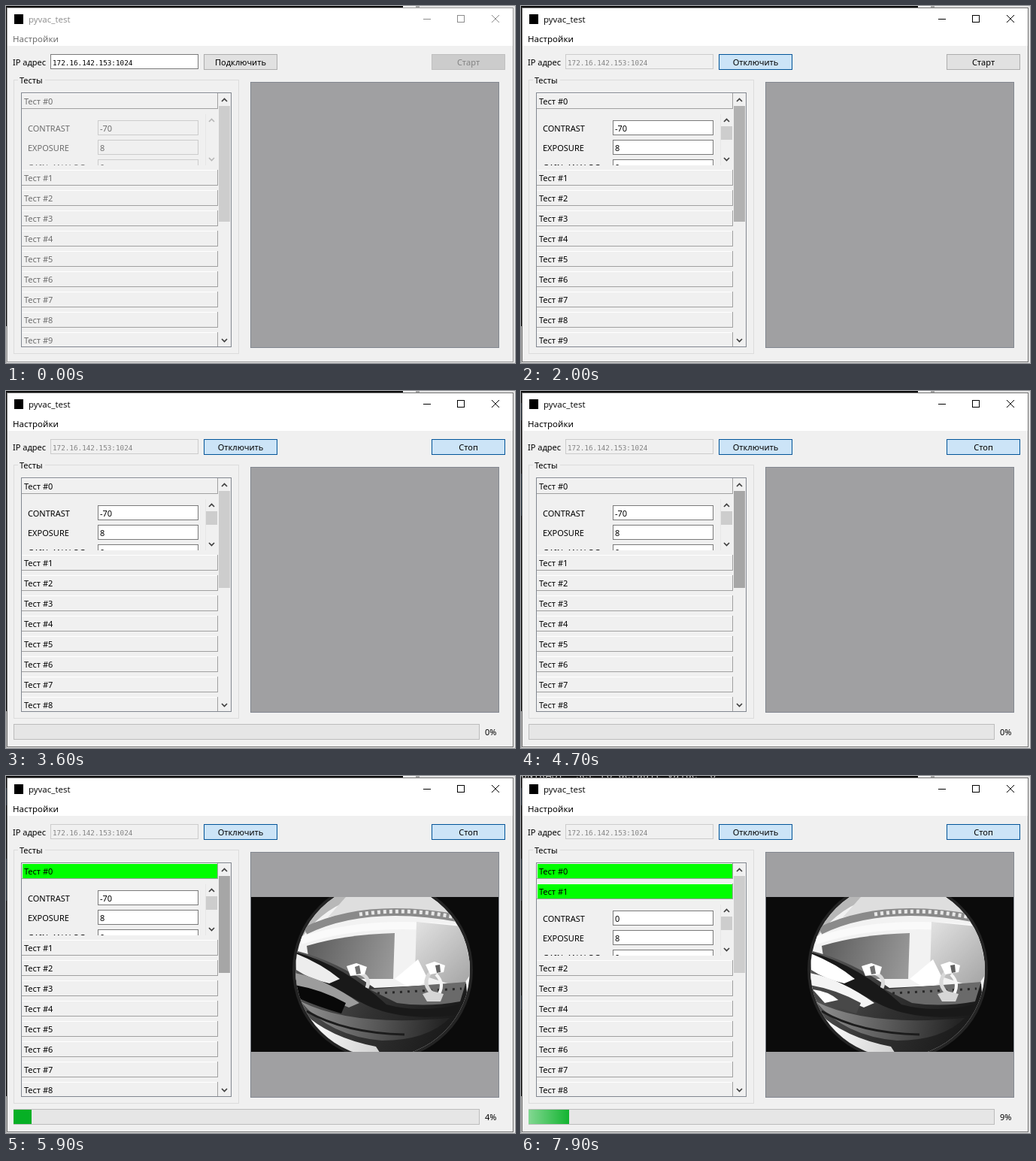
Write an HTML page with a canvas that moves like this. It is 677 by 475 pixels and loops after 8 s.

```html
<!DOCTYPE html>
<html lang="ru">
<head>
<meta charset="utf-8">
<title>pyvac_test</title>
<style>
  html, body { margin: 0; width: 100%; height: 100%; overflow: hidden; background: #f0f0f0; }
  canvas { display: block; }
</style>
</head>
<body>
<canvas id="stage" width="677" height="475"></canvas>
<script>
const ctx = document.getElementById('stage').getContext('2d');
const LOOP = 8000, STEP = 100;
const UI = '11px "Noto Sans", sans-serif';
const MENU = '11.5px "Noto Sans", sans-serif';
const TITLE = '11.5px "Open Sans", sans-serif';
const FIELD = '9.3px "DejaVu Sans Mono", monospace';
const CONSOLE = '13.5px "Liberation Mono", monospace';

const ramp = (t, from, to) => Math.min(1, Math.max(0, (t - from) / (to - from)));
const mix = (a, b, k) => `rgb(${a.map((v, i) => Math.round(v + (b[i] - v) * k))})`;
const gray = v => `rgb(${v},${v},${v})`;

function fill(x, y, w, h, color) {
  ctx.fillStyle = color;
  ctx.fillRect(x, y, w, h);
}

function box(x, y, w, h, back, border) {
  fill(x, y, w, h, border);
  fill(x + 1, y + 1, w - 2, h - 2, back);
}

function text(s, x, y, color = '#000', font = UI, align = 'left') {
  ctx.font = font;
  ctx.textAlign = align;
  ctx.fillStyle = color;
  ctx.fillText(s, x, y);
}

function line(points, color, width = 1) {
  ctx.beginPath();
  points.forEach(([x, y]) => ctx.lineTo(x, y));
  ctx.strokeStyle = color;
  ctx.lineWidth = width;
  ctx.stroke();
}

function shape(d, color) {
  ctx.fillStyle = color;
  ctx.fill(new Path2D(d));
}

function stroke(d, color, width) {
  ctx.strokeStyle = color;
  ctx.lineWidth = width;
  ctx.stroke(new Path2D(d));
}

function linear(x0, y0, x1, y1, ...colors) {
  const g = ctx.createLinearGradient(x0, y0, x1, y1);
  colors.forEach((c, i) => g.addColorStop(i / (colors.length - 1), c));
  return g;
}

function clipped(x, y, w, h, draw) {
  ctx.save();
  ctx.beginPath();
  ctx.rect(x, y, w, h);
  ctx.clip();
  draw();
  ctx.restore();
}

function chevron(x, y, dir, color) {
  line([[x - 3.5, y + 2 * dir], [x, y - 1.5 * dir], [x + 3.5, y + 2 * dir]], color, 1.7);
}

function button(x, label, press, enabled = true) {
  const back = press > 0 ? mix([229, 241, 251], [204, 228, 247], press) : '#e1e1e1';
  const border = press > 0 ? mix([0, 120, 215], [0, 84, 153], press) : '#adadad';
  box(x, 64, 98, 21, enabled ? back : '#cccccc', enabled ? border : '#bfbfbf');
  text(label, x + 49, 79, enabled ? '#000' : '#838383', UI, 'center');
}

function field(y, value, enabled) {
  box(122, y, 134, 20, enabled ? '#fff' : '#f0f0f0', enabled ? '#7a7a7a' : '#cccccc');
  text(value, 125, y + 15, enabled ? '#000' : '#6d6d6d');
}

function desktop(t) {
  fill(0, 0, 677, 475, '#e4e4e4');
  fill(0, 0, 528, 3, '#0c0c0c');
  fill(528, 0, 17, 3, '#f0f0f0');
  fill(545, 0, 5, 3, '#a8a8a8');
  fill(0, 0, 1, 426, '#0c0c0c');
  fill(0, 426, 1, 49, '#b4b4b4');
  if (t >= 3800) fill(0, 16, 1, 23, '#26303c');
  if (t >= 4700) fill(0, 110, 1, 56, '#26303c');
  if (t >= 6100) fill(0, 292, 1, 19, '#26303c');
  if (t >= 6400) clipped(0, 0, 528, 3, () =>
    text('ONTRAST  set to default value  0', 0, t >= 7300 ? 3 : 4, '#cccccc', CONSOLE));
}

function chrome(active) {
  const ink = active ? '#000' : '#8c8c8c';
  box(1, 2, 674, 472, '#f0f0f0', active ? '#707070' : '#9a9a9a');
  fill(2, 3, 672, 50, '#fff');
  fill(11, 11, 12, 13, '#000');
  text('pyvac_test', 30, 22, ink, TITLE);
  text('Настройки', 9, 48, active ? '#000' : '#6d6d6d', MENU);
  line([[555, 17.5], [565, 17.5]], ink);
  ctx.strokeStyle = ink;
  ctx.strokeRect(600.5, 12.5, 9, 9);
  line([[646, 12], [656, 22]], ink);
  line([[656, 12], [646, 22]], ink);
}

function tab(i, y, enabled, passed) {
  fill(21, y, 261, 21, '#f0f0f0');
  fill(21, y, 261, 1, '#fff');
  if (passed) fill(22, y + 1, 259, 19, '#00ff00');
  fill(21, y + 20, 261, 1, '#a0a0a0');
  fill(281, y, 1, 21, '#a0a0a0');
  text('Тест #' + i, 24, y + 15, enabled ? '#000' : '#6d6d6d');
}

function page(y, contrast, enabled) {
  const ink = enabled ? '#000' : '#6d6d6d';
  clipped(21, y, 261, 75, () => {
    [['CONTRAST', contrast], ['EXPOSURE', '8'], ['GAIN_ANALOG', '0']].forEach(([name, value], i) => {
      const top = y + 15 + 26 * i;
      text(name, 29, top + 15, ink);
      field(top, value, enabled);
    });
  });
  fill(265, y + 7, 1, 68, '#e6e6e6');
  chevron(273.5, y + 15, 1, enabled ? '#404040' : '#b8b8b8');
  chevron(273.5, y + 67, -1, enabled ? '#404040' : '#b8b8b8');
  if (enabled) fill(266, y + 23, 15, 18, '#cdcdcd');
}

function tests(t, enabled, bottom) {
  ctx.strokeStyle = '#dcdcdc';
  ctx.lineWidth = 1;
  ctx.strokeRect(10.5, 98.5, 299, bottom + 8 - 98);
  fill(16, 95, 36, 8, '#f0f0f0');
  text('Тесты', 18, 103);

  box(20, 115, 280, bottom - 115, '#f0f0f0', '#828790');
  const open = t >= 7300 ? 1 : 0;
  clipped(21, 116, 278, bottom - 117, () => {
    for (let i = 0; i < 10; i++) {
      const y = 116 + 27 * i + (i > open ? 75 : 0);
      tab(i, y, enabled, t >= [5300, 6400][i]);
    }
    page(137 + 27 * open, open ? '0' : '-70', enabled);
  });

  let shade = 205;
  if (enabled && t < 3400) shade = 177;
  else if (t >= 4100) shade = Math.round(205 - 39 * (ramp(t, 4000, 4500) - ramp(t, 6300, 7000)));
  fill(283, 133, 15, bottom === 454 ? 154 : 129, gray(shade));
  chevron(290.5, 125, 1, t >= 2800 && t < 3000 ? '#000' : '#404040');
  chevron(290.5, bottom - 9, -1, '#404040');
}

// Fisheye view of a workbench, in flat tones.
function photo(soft) {
  fill(326, 161, 329, 206, '#0b0b0b');
  ctx.save();
  ctx.beginPath();
  ctx.rect(326, 161, 329, 206);
  ctx.clip();
  ctx.beginPath();
  ctx.arc(501, 258, 120, 0, 7);
  ctx.fillStyle = '#242424';
  ctx.fill();
  ctx.beginPath();
  ctx.arc(501, 258, 116, 0, 7);
  ctx.clip();

  fill(380, 140, 245, 240, '#f2f2f2');
  shape('M380 161H472Q425 172 394 214L380 226Z', '#b8b8b8');
  shape('M452 161H590L612 198Q540 164 428 188Z', '#dedede');
  stroke('M398 206Q480 166 606 190', '#8a8a8a', 10);
  ctx.setLineDash([4, 4]);
  stroke('M470 184Q540 174 606 190', '#e8e8e8', 5);
  ctx.setLineDash([]);
  stroke('M392 219Q480 190 600 203', '#fafafa', 10);
  shape('M400 226Q450 211 517 209L515 270H470L402 240Z', linear(410, 220, 517, 255, '#606060', '#9a9a9a'));
  shape('M546 194L606 200L620 260L606 282L544 262Z', linear(545, 200, 615, 270, '#e0e0e0', '#a8a8a8'));
  shape('M517 270L548 244L562 272L540 284Z', '#fff');

  shape('M384 232Q440 246 490 282L612 276L620 380H380Z', linear(400, 260, 590, 350, '#555555', '#303030', '#191919'));
  shape('M484 284L612 274L604 300Q560 308 520 302Z', '#6a6a6a');
  ctx.setLineDash([3, 7]);
  stroke('M494 289L606 283', '#282828', 3);
  ctx.setLineDash([]);
  shape('M384 234Q450 252 506 304Q550 316 604 304L598 318Q520 328 470 300Q420 272 386 258Z', '#191919');
  shape('M385 236Q420 250 444 270L430 276Q404 270 386 258Z', soft ? '#ffffff' : '#ededed');
  shape('M384 262Q425 270 470 302L456 308Q420 292 386 284Z', soft ? '#f4f4f4' : '#9c9c9c');
  shape('M384 278Q420 284 452 302L446 316Q412 306 390 296Z', soft ? '#484848' : '#080808');
  if (soft) shape('M388 284Q408 286 422 298L404 302Z', '#fff');
  shape('M392 300Q460 334 590 322Q560 352 500 352Q430 346 392 300Z',
    linear(400, 310, 580, 335, '#8c8c8c', '#5a5a5a', '#242424'));
  stroke('M400 313Q450 342 530 344', '#1c1c1c', 3);
  shape('M394 314Q430 348 492 360L505 380H420Z', linear(400, 330, 500, 365, '#ffffff', '#d0d0d0'));

  stroke('M470 262Q486 268 480 282', '#dadada', 5);
  shape('M453 253L466 249L480 254L477 264L458 266Z', '#fff');
  shape('M464 254L470 252L472 263L466 264Z', '#707070');
  stroke('M566 260Q550 276 570 292', '#d8d8d8', 5);
  stroke('M572 264Q586 278 572 296', '#f6f6f6', 4);
  shape('M558 251L570 247L584 252L582 261L564 264Z', '#fff');
  shape('M571 252L577 251L578 261L573 262Z', '#606060');
  shape('M554 290L566 286L582 290L578 300L560 300Z', '#d6d6d6');
  ctx.restore();
}

function preview(t, bottom) {
  box(325, 101, 331, bottom - 100, '#a0a0a2', '#828790');
  if (t >= 5300) photo(t >= 7300);
}

function progress(t) {
  box(10, 443, 620, 21, '#e6e6e6', '#bcbcbc');
  const width = 24 * ramp(t, 5200, 5800) + 30 * ramp(t, 6300, 6900);
  if (width > 0) {
    fill(10, 444, width, 19, '#06b025');
    const center = t < 7200 ? 30 + (t - 6400) / 10 : 10 + (t - 7900) / 10;
    if (t >= 6400) {
      fill(10, 444, width, 19, linear(center - 60, 0, center + 60, 0,
        'rgba(255,255,255,0)', 'rgba(255,255,255,.5)', 'rgba(255,255,255,0)'));
    }
  }
  text(t >= 6400 ? '9%' : t >= 5300 ? '4%' : '0%', 637, 458);
}

function draw(t) {
  const linked = t >= 2000, running = t >= 3400;
  const bottom = running ? 427 : 454;
  desktop(t);
  chrome(t >= 500);

  text('IP адрес', 9, 79);
  box(59, 64, 197, 20, linked ? '#f0f0f0' : '#fff', linked ? '#cccccc' : '#7a7a7a');
  text('172.16.142.153:1024', 62, 79, linked ? '#838383' : '#000', FIELD);
  button(263, linked ? 'Отключить' : 'Подключить', ramp(t, 400, 700));
  button(566, running ? 'Стоп' : 'Старт', ramp(t, 3100, 3400), linked);

  tests(t, linked, bottom);
  preview(t, bottom);
  if (running) progress(t);
}

const start = performance.now();
function tick() {
  const t = (performance.now() - start) % LOOP;
  draw(Math.floor(t / STEP) * STEP);
  requestAnimationFrame(tick);
}
tick();
</script>
</body>
</html>
```
